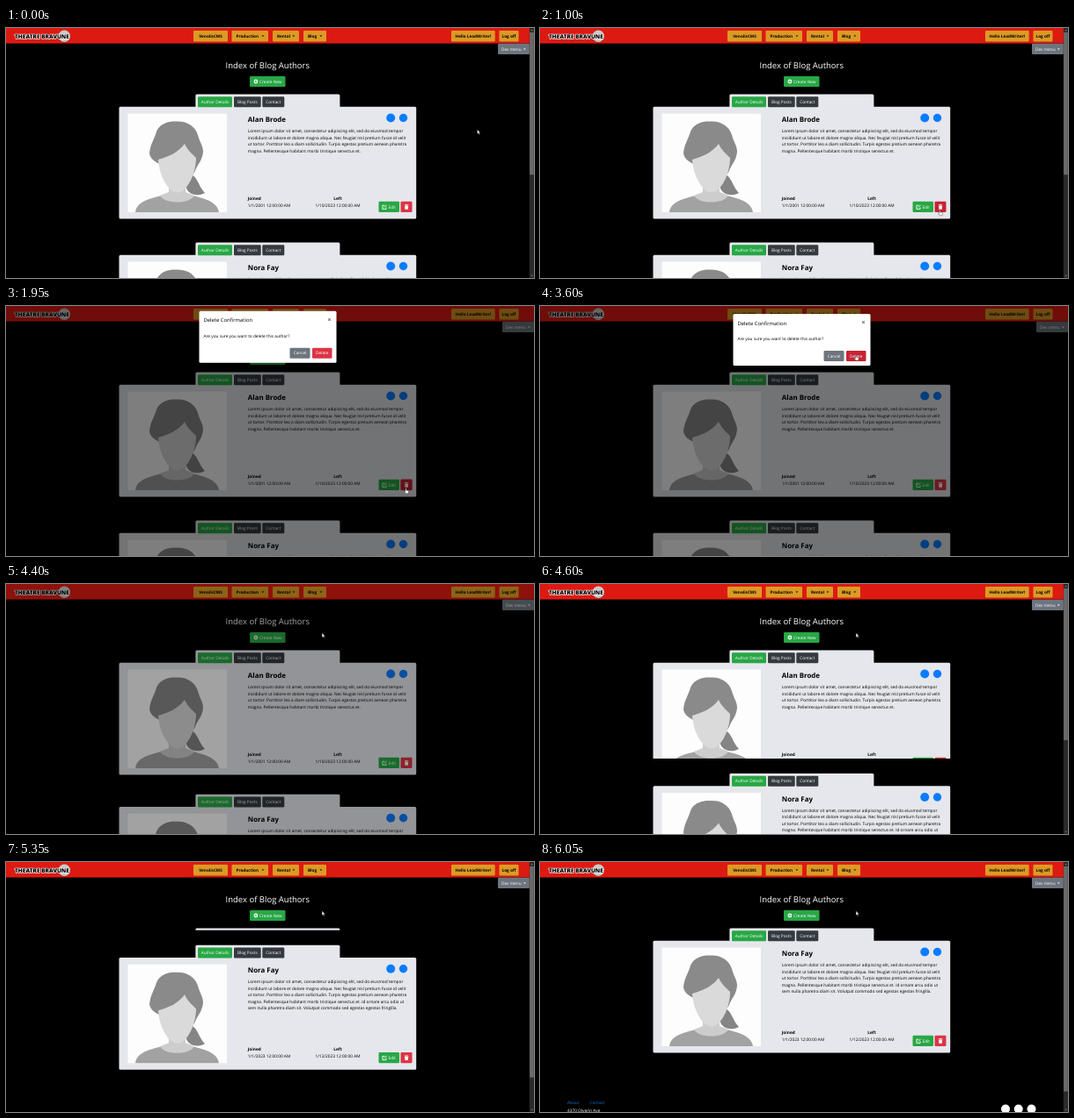
Animation of 600x285 px, one loop 6200 ms. Source, as an HTML page:

```html
<!DOCTYPE html>
<html lang="en">
<head>
<meta charset="utf-8">
<title>Blog authors</title>
<style>
  html, body { margin: 0; width: 100%; height: 100%; overflow: hidden; background: #000; }
  svg { display: block; width: 100%; height: 100%; }
  text { font-family: "Open Sans", "Noto Sans", sans-serif; font-size: 4.75px; text-rendering: geometricPrecision; white-space: pre; }
  .b { font-weight: 700; }
  .nav { font-weight: 700; font-size: 4.65px; }
  .h1 { font-size: 9.5px; }
  .name { font-weight: 700; font-size: 7.9px; }
  .brand { font-weight: 800; font-size: 6.5px; paint-order: stroke; stroke: #fff; stroke-width: 1.3px; stroke-linejoin: round; }
  .h5 { font-size: 5.9px; }
  .x { font-weight: 700; font-size: 7px; }
</style>
</head>
<body>
<svg id="stage" viewBox="0 0 600 285"></svg>
<script>
const GREEN = '#28a745', RED = '#dc3545', RED_HOVER = '#c82333', GRAY = '#6c757d',
      DARK = '#343a40', GOLD = '#dc9a24', BLUE = '#0a7cff', PANEL = '#e5e7ec', INK = '#000';
const LOOP = 6200, ROW = 169, CARD_END = 227.5, CARD_HEIGHT = 151.5;

const rect = (x, y, w, h, fill, r = 0, extra = '') =>
  `<rect x="${x}" y="${y}" width="${w}" height="${h}" rx="${r}" fill="${fill}" ${extra}/>`;
const text = (x, y, s, fill = INK, cls = '', anchor = 'start') =>
  `<text x="${x}" y="${y}" fill="${fill}" class="${cls}" text-anchor="${anchor}">${s}</text>`;
const path = (d, fill, extra = '') => `<path d="${d}" fill="${fill}" ${extra}/>`;
const dot = (x, y, r, fill) => `<circle cx="${x}" cy="${y}" r="${r}" fill="${fill}"/>`;
const caret = (x, y, fill) => path(`M${x} ${y}h2.8l-1.4 1.5z`, fill);
const button = (x, y, w, h, fill, label, color = '#fff', cls = '', extra = '') =>
  rect(x, y, w, h, fill, 1.2, extra) + text(x + w / 2, y + h / 2 + 1.7, label, color, cls, 'middle');
const menu = (x, w, label) =>
  rect(x, 3, w, 12.5, GOLD, 1.2) + text(x + 5, 10.9, label, INK, 'nav') + caret(x + w - 7.5, 8.6, INK);

const portrait = () =>
  rect(138.5, 97.5, 112.5, 112.5, '#fdfdfd') +
  path('M147 210C148 199 160 195 179 190.5H210C229 195 240 199 242 210Z', '#a2a2a2') +
  path('M205 167C218 165 217 179 226 188C217 193 204 190 204 177Z', '#858585') +
  path('M163 143C164 132 169 126 171 118C175 108 186 106 194 106.5C206 106 215 112 218 122C220 130 224 134 224 141C223 152 217 156 215 163L211 169L174 155C169 152 164 149 163 143Z', '#8a8a8a') +
  path('M185 176H204V187L214 191C209 201 180 201 175 191L185 187Z', '#cdcdcd') +
  path('M173 150C184 147 196 142 203 132C206 139 212 144 216 148C216 166 206 187 195 187.5C184 187 174 168 173 150Z', '#dadada');

const LOREM = [
  'Lorem ipsum dolor sit amet, consectetur adipiscing elit, sed do eiusmod tempor',
  'incididunt ut labore et dolore magna aliqua. Nec feugiat nisl pretium fusce id velit',
  'ut tortor. Porttitor leo a diam sollicitudin. Turpis egestas pretium aenean pharetra',
  'magna. Pellentesque habitant morbi tristique senectus et.'
];

const card = (id, name, lines, joined, left) =>
  rect(215.4, 75.5, 164, 17, PANEL, 1.5) + rect(128.5, 89.8, 337.7, 127.6, PANEL, 1.5) +
  button(218, 78.3, 39, 11.9, GREEN, 'Author Details') +
  button(259, 78.3, 30.7, 11.9, DARK, 'Blog Posts') +
  button(291.3, 78.3, 25, 11.9, DARK, 'Contact') +
  portrait() +
  text(274.8, 107, name, INK, 'name') +
  dot(437.2, 102.5, 5, BLUE) + dot(451.5, 102.5, 4.7, BLUE) +
  lines.map((s, i) => text(274.8, 119.2 + i * 7.5, s)).join('') +
  text(274.8, 196, 'Joined', INK, 'b') + text(274.8, 203.8, joined) +
  text(377, 196, 'Left', INK, 'b', 'middle') + text(377, 203.8, left, INK, '', 'middle') +
  rect(423.5, 197.7, 23.5, 12.2, GREEN, 1.2) + text(434.5, 205.6, 'Edit', '#fff') +
  path('M430.5 202.2h-2.6v4.2h4.2v-2M429.8 204.6l2.9-2.9', 'none', 'stroke="#fff" stroke-width=".9"') +
  rect(448.5, 197.7, 13, 12.2, RED, 1.2, `id="${id}"`) +
  path('M452.8 201.6h1.4l.3-.5h1.2l.3.5h1.4v.7h-4.6zM453.1 202.7h4l-.3 4h-3.4z', '#fff');

stage.innerHTML = `
  <clipPath id="clip"><rect id="window" x="120" y="70" width="360" height="160"/></clipPath>
  <g clip-path="url(#clip)">${card('trash', 'Alan Brode', LOREM, '1/1/2001 12:00:00 AM', '1/10/2023 12:00:00 AM')}</g>
  <g id="below">
    <g transform="translate(0 ${ROW})">
      ${card('trash2', 'Nora Fay', [...LOREM.slice(0, 3),
        LOREM[3] + ' Id ornare arcu odio ut',
        'sem nulla pharetra diam sit. Volutpat commodo sed egestas egestas fringilla.'],
        '1/1/2023 12:00:00 AM', '1/12/2023 12:00:00 AM')}
      ${text(31, 275.8, 'About', '#1b6fd6')}${text(56.5, 275.8, 'Contact', '#1b6fd6')}
      ${text(31, 285, '4370 Olverin Ave', '#fff')}
      ${[529, 543.7, 558.5].map(x => dot(x, 281.5, 5, '#fff')).join('')}
    </g>
  </g>
  ${rect(0, 0, 600, 17.6, '#dd1a12')}
  ${dot(66.3, 9.3, 6.7, '#c9c9c9')}
  ${text(10, 12, 'THEATRE BRAVUNE', '#000', 'brand')}
  ${button(213, 3, 39, 12.5, GOLD, 'VenolisCMS', INK, 'nav')}
  ${menu(256.5, 41.5, 'Production')}${menu(303, 30, 'Rental')}${menu(338, 26, 'Blog')}
  ${button(506, 3, 49.7, 12.5, GOLD, 'Hello LeadWriter!', INK, 'nav')}
  ${button(560.5, 3, 22, 12.5, GOLD, 'Log off', INK, 'nav')}
  <g id="dev">${rect(559, 17.8, 36, 12.2, GRAY, 1)}${text(563, 25.7, 'Dev menu', '#fff')}${caret(588, 23.4, '#fff')}</g>
  ${text(297.3, 45.7, 'Index of Blog Authors', '#fff', 'h1', 'middle')}
  ${rect(277, 55, 40.5, 12, GREEN, 1.2)}${text(288, 62.7, 'Create New', '#fff')}
  ${dot(283.9, 61, 2.4, '#fff')}${path('M282.5 61h2.8M283.9 59.6v2.8', 'none', `stroke="${GREEN}" stroke-width=".8"`)}
  <g id="bar">
    ${rect(594.8, 0, 5.2, 285, '#2a2a2a')}
    ${path('M596.4 3.2h2.4l-1.2-1.4zM596.4 281.8h2.4l-1.2 1.4z', '#8a8a8a')}
    ${rect(595.1, 5, 4.7, 160, '#6a6a6a', 0, 'id="thumb"')}
  </g>
  ${rect(0, 0, 600, 285, '#000', 0, 'id="backdrop"')}
  <g id="modal">
    ${rect(219.5, 9, 156, 59, '#fff', 1.5)}
    ${text(224.5, 21.5, 'Delete Confirmation', INK, 'h5')}
    ${text(367.5, 21, '×', '#555', 'x', 'middle')}
    ${text(224.5, 39.2, 'Are you sure you want to delete this author?')}
    ${button(322.5, 51, 23, 12, GRAY, 'Cancel')}
    ${button(348, 51, 22.5, 12, RED, 'Delete', '#fff', '', 'id="confirm"')}
  </g>
  <g id="cursor" stroke="#222" stroke-width=".4" stroke-linejoin="round">
    ${path('M0 0V5L1.2 4L2 5.8L2.8 5.4L2 3.7H3.5Z', '#fff', 'id="arrow"')}
    ${path('M-.5 .5Q0-.2 .5 .5V2.4L2.6 2.9Q3.2 3.1 3.1 3.8L2.6 6.3H-.3L-1.8 4Q-1.7 3.2-1 3.5L-.5 4Z', '#fff', 'id="hand"')}
  </g>`;

const $ = id => document.getElementById(id);
const set = (id, attr, value) => $(id).setAttribute(attr, value);
const ramp = (t, start, length) => Math.min(1, Math.max(0, (t - start) / length));
const smooth = p => p * p * (3 - 2 * p);
const easeOut = p => 1 - (1 - p) ** 1.7;
const bezier = (a, b, c, p) => (1 - p) ** 2 * a + 2 * p * (1 - p) * b + p * p * c;

function pointer(t) {
  if (t < 1950) {
    const p = smooth(ramp(t, 40, 920));
    return [bezier(535.5, 495, 454.5, p), bezier(115.8, 162, 207.5, p)];
  }
  const p = smooth(ramp(t, 1950, 1200));
  return [bezier(454.5, 381, 359.1, p), bezier(207.5, 128, 55.8, p)];
}

function draw(t) {
  // Deleted card collapses, then its leftover margin goes at once.
  const slide = CARD_HEIGHT * (0.5 - Math.cos(Math.PI * ramp(t, 4270, 1160)) / 2);
  const shift = t < 5480 ? slide : ROW;
  set('window', 'height', Math.max(0, CARD_END - slide - 70) * (t < 5480));
  set('below', 'transform', `translate(0 ${-shift})`);
  set('thumb', 'height', 275 * 285 / (483 - shift * 1.05));

  // Dialog and backdrop
  const open = t >= 1350 && t < 4540;
  const leaving = ramp(t, 4180, 200);
  const drop = easeOut(ramp(t, 1600, 580)) - easeOut(ramp(t, 4180, 400));
  set('backdrop', 'opacity', 0.5 * (ramp(t, 1340, 280) - ramp(t, 4340, 220)));
  set('modal', 'opacity', ramp(t, 1600, 290) - leaving);
  set('modal', 'transform', `translate(0 ${-15.6 * (1 - drop)})`);
  set('bar', 'opacity', open ? 0 : 1);
  set('dev', 'transform', `translate(${open ? 5 : 0} 0)`);

  // Pointer and hover states
  const [x, y] = pointer(t);
  const onTrash = x < 461.5 && x > 448.5 && y > 198;
  const onConfirm = t > 2500 && t < 4380 && x < 370.5 && y < 63;
  set('trash', 'fill', onTrash ? RED_HOVER : RED);
  set('trash', 'stroke', onTrash && t >= 1350 ? '#dc354580' : 'none');
  set('confirm', 'fill', onConfirm ? RED_HOVER : RED);
  set('cursor', 'transform', `translate(${x} ${y})`);
  set('hand', 'opacity', onTrash || onConfirm ? 1 : 0);
  set('arrow', 'opacity', onTrash || onConfirm ? 0 : 1);
}

const start = performance.now();
(function frame() {
  draw((performance.now() - start) % LOOP);
  requestAnimationFrame(frame);
})();
</script>
</body>
</html>
```
